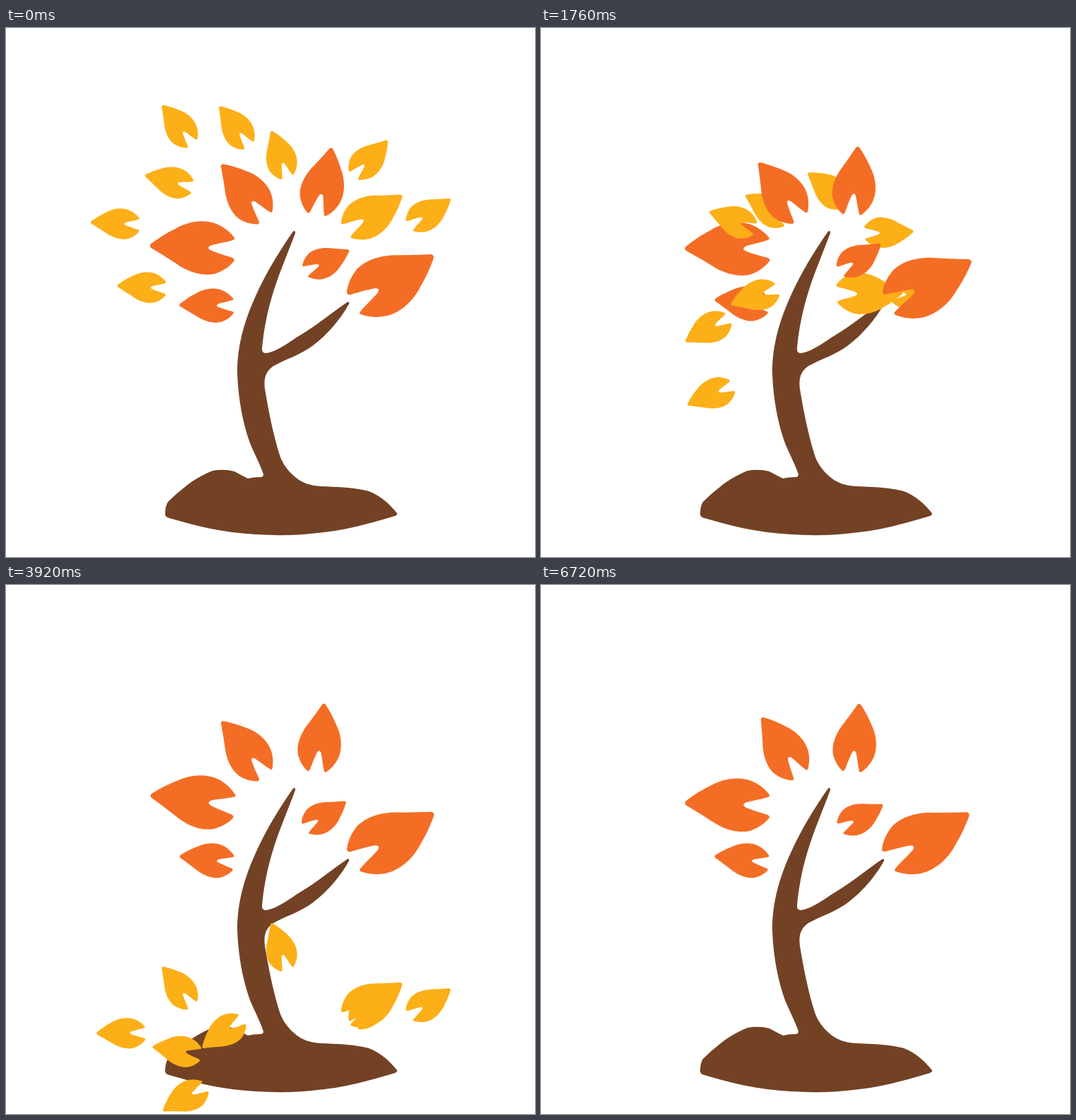
These frames come from a looping animation (748 by 748 pixels, 6760 ms). An HTML page:

```html
<!DOCTYPE html>
<html lang="en">
<head>
<meta charset="utf-8">
<title>Autumn tree</title>
<style>
  html, body { margin: 0; width: 100%; height: 100%; overflow: hidden; background: #fff; }
  svg { display: block; width: 100vw; height: 100vh; }
  .trunk { fill: #734225; }
  .orange { fill: #f46d25; }
  .yellow { fill: #fcaf17; }
</style>
</head>
<body>
<svg viewBox="0 0 748 748">
  <defs>
    <!-- tip at the origin, stem notch to the right -->
    <path id="leaf" d="M1-2C12-11 22-18 35-25C52-36 75-40 92-34C103-30 111-24 118-16Q120-13 116-12C105-8 97-7 85-3Q79 1 86 4C97 8 106 10 117 13Q121 15 119 18C112 27 103 33 92 37C75 41 58 36 43 28C30 20 14 11 1 4Q-2 1 1-2Z"/>
  </defs>
  <path class="trunk" d="M405 289C391 309 374 336 362 360C344 396 327 438 327 486C328 521 334 556 345 587C351 602 359 616 364 631Q364 635 360 635Q350 635 342 637Q332 632 323 627Q308 623 292 626Q277 632 262 642Q244 655 229 670Q225 676 225 688Q226 692 231 693C262 702 290 709 320 713C362 718 405 719 450 713C485 709 519 699 550 690Q555 688 552 685C542 673 531 662 513 655C490 649 467 649 445 648C430 647 418 643 409 635C399 627 391 616 387 604C377 572 371 540 366 510C364 494 368 485 378 478C396 468 417 462 434 449C455 433 473 412 485 390Q486 386 482 388C460 403 440 420 415 435C402 443 388 454 375 458Q362 463 362 454C364 430 369 403 376 380C385 349 398 320 409 290Q409 284 405 289Z"/>
  <g id="leaves"></g>
</svg>
<script>
const LOOP = 6760, STEP = 40;
const LENGTH = 118, SMALL = .575;
const DIP = 35;      // extra drop at the far end of a swing
const EASE_IN = 400; // how slowly a leaf gains speed, in ms
const parent = document.getElementById("leaves");
const movers = [];

function addLeaf(color) {
  const el = document.createElementNS("http://www.w3.org/2000/svg", "use");
  el.setAttribute("href", "#leaf");
  el.setAttribute("class", color);
  parent.append(el);
  return el;
}

// Puts the point `along` the leaf's axis at x, y.
function place(el, x, y, angle, size, along) {
  el.setAttribute("transform",
    `translate(${x} ${y}) rotate(${angle}) scale(${size}) translate(${-along})`);
}

// Wags about the stem end; `peak` is a time of the largest angle.
function sway(x, y, size, { angle, swing, period, peak }) {
  const el = addLeaf("orange");
  movers.push(t => {
    const wag = Math.cos(2 * Math.PI * (t - peak) / period);
    place(el, x, y, angle + swing * wag, size, LENGTH);
  });
}

// Drops from rest, swinging out by `drift` and `turn` and back once per period.
function fall(x, y, angle, { start, speed, drift, turn, period = 3200, size = SMALL }) {
  const el = addLeaf("yellow");
  movers.push(t => {
    const s = Math.max(0, t - start);
    const out = Math.sin(Math.PI * s / period) ** 2;
    const drop = speed * s * s / (s + EASE_IN) + DIP * out;
    place(el, x + drift * out, y + drop, angle + turn * out, size, LENGTH / 2);
  });
}

sway(322, 312, 1, { angle: 4.4, swing: -3.9, period: 630, peak: 523 });
sway(321, 392.5, .64, { angle: 3.8, swing: -3.4, period: 700, peak: 70 });

fall(242.5, 136, 52, { start: 750, speed: .153, drift: 40, turn: -45 });
fall(323, 138, 53, { start: 850, speed: .17, drift: -18, turn: -90, period: 5600 });
fall(387, 178, 71, { start: 1280, speed: .145, drift: 60, turn: -110, period: 2640 });
fall(516, 184, 134, { start: 950, speed: .158, drift: -42, turn: 78, period: 3000 });
fall(521, 262, 148, { start: 700, speed: .114, drift: -75, turn: 42, size: .78 });
fall(600, 261, 147, { start: 700, speed: .115, drift: -95, turn: 38 });
fall(230, 216, 14, { start: 550, speed: .145, drift: 78, turn: -35, period: 3000 });
fall(154, 276, 3, { start: 400, speed: .112, drift: 85, turn: -33 });
fall(191.5, 366, 3.4, { start: 100, speed: .094, drift: 60, turn: -33, period: 2540 });

sway(366.5, 267.5, .815, { angle: 53.6, swing: 2.7, period: 790, peak: 395 });
sway(440, 263, .807, { angle: 99, swing: -3.7, period: 697, peak: 348 });
sway(493, 390, 1.1, { angle: 150.3, swing: 2.6, period: 780, peak: 257 });
sway(424, 344, .573, { angle: 150, swing: -4.6, period: 730, peak: 365 });

const begin = performance.now();
function draw() {
  const elapsed = (performance.now() - begin) % LOOP;
  const t = Math.floor(elapsed / STEP) * STEP;
  movers.forEach(move => move(t));
  requestAnimationFrame(draw);
}
draw();
</script>
</body>
</html>
```
